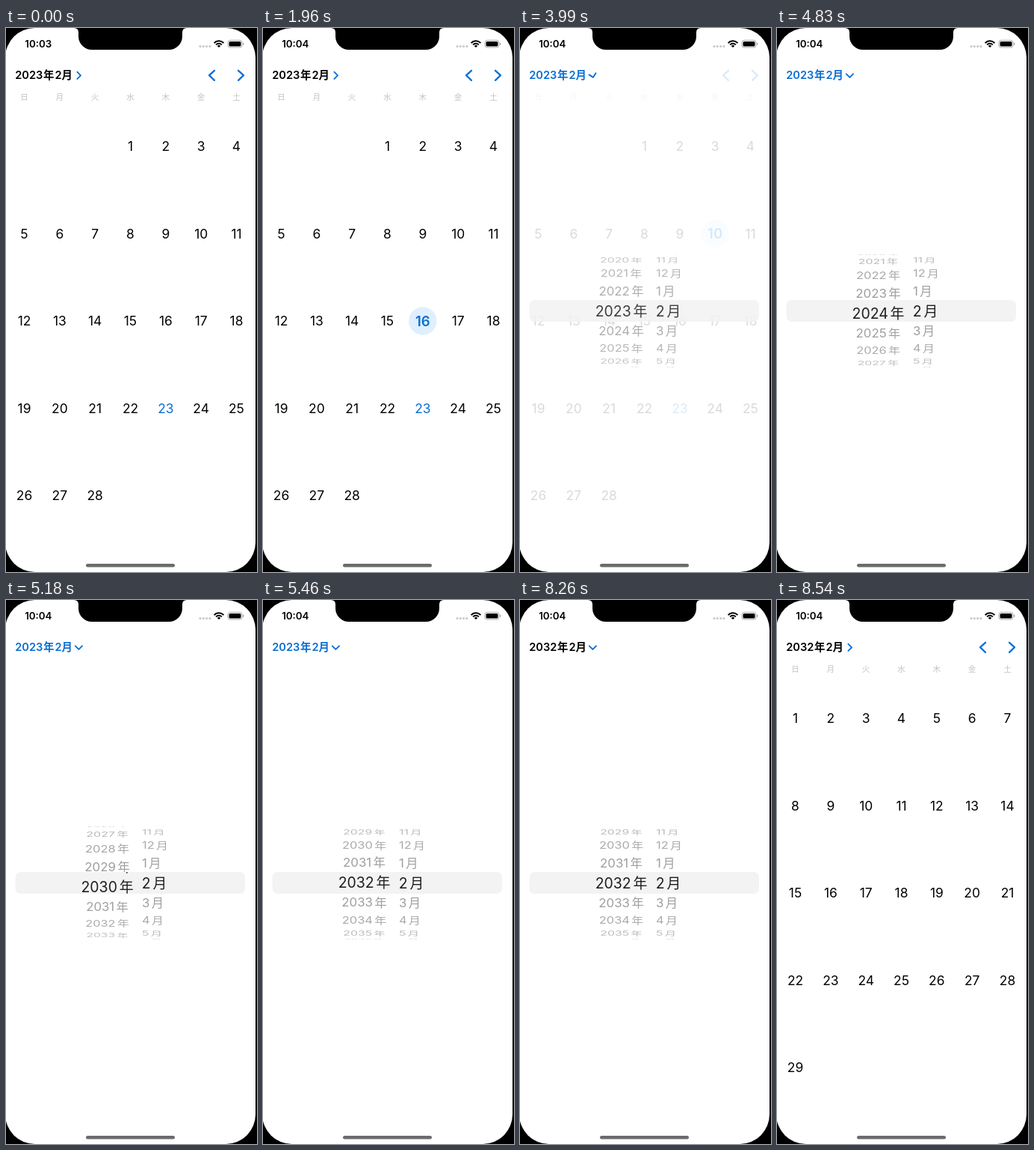
Write an HTML page with a canvas that moves like this. It is 336x726 px and loops after 8.61 s.

```html
<!DOCTYPE html>
<html lang="ja">
<head>
<meta charset="utf-8">
<title>Calendar date picker</title>
<style>
  html, body { margin: 0; width: 100%; height: 100%; overflow: hidden; background: #000; }
  canvas { display: block; width: 336px; height: 726px; }
</style>
</head>
<body>
<canvas id="stage"></canvas>
<script>
const W = 336, H = 726, LOOP = 8610, STEP = 70;
const BLUE = '#0b6fd3', BLACK = '#000';
const LATIN = 'Inter, "Liberation Sans", sans-serif';
const CJK = '"Noto Sans CJK JP", "Noto Sans CJK", sans-serif';

const canvas = document.getElementById('stage');
const ctx = canvas.getContext('2d');
const dpr = window.devicePixelRatio || 1;
canvas.width = W * dpr;
canvas.height = H * dpr;

// [time, value] tables
const SELECTED = [[0, 0], [1120, 15], [1960, 16], [2730, 10]];
const FADE = [[0, 0], [3780, 0], [3850, .2], [3920, .55], [3990, .85], [4060, 1],
  [8260, 1], [8330, .8], [8400, .45], [8470, .15], [8540, 0]];
const YEAR = [[0, 2023], [4830, 2023.87], [4900, 2025], [4970, 2026.3], [5040, 2027.6],
  [5110, 2028.8], [5180, 2029.8], [5250, 2030.7], [5320, 2031.35], [5390, 2031.8],
  [5460, 2032.02], [5670, 2032.01], [5740, 2032]];

function at(table, t) {
  let value = table[0][1];
  for (const [time, v] of table) if (t >= time) value = v;
  return value;
}

// Text centred vertically on y
function text(str, x, y, size, { color = BLACK, weight = 400, align = 'center', cjk = false } = {}) {
  ctx.font = `${weight} ${size}px ${cjk ? CJK : LATIN}`;
  ctx.textAlign = align;
  ctx.fillStyle = color;
  ctx.fillText(str, x, y + size * (cjk ? .38 : .3635));
}

function line(points, color, width) {
  ctx.beginPath();
  points.forEach(([x, y]) => ctx.lineTo(x, y));
  ctx.strokeStyle = color;
  ctx.lineWidth = width;
  ctx.lineCap = ctx.lineJoin = 'round';
  ctx.stroke();
}

function box(x, y, w, h, r, color) {
  ctx.beginPath();
  ctx.roundRect(x, y, w, h, r);
  ctx.fillStyle = color;
  ctx.fill();
}

function disc(x, y, r, color) {
  ctx.beginPath();
  ctx.arc(x, y, r, 0, Math.PI * 2);
  ctx.fillStyle = color;
  ctx.fill();
}

function drawNotch() {
  ctx.beginPath();
  ctx.moveTo(91, 0);
  ctx.quadraticCurveTo(97, 0, 97, 6);
  ctx.lineTo(97, 11);
  ctx.arcTo(97, 29, 115, 29, 18);
  ctx.lineTo(218, 29);
  ctx.arcTo(236, 29, 236, 11, 18);
  ctx.lineTo(236, 6);
  ctx.quadraticCurveTo(236, 0, 242, 0);
  ctx.fillStyle = BLACK;
  ctx.fill();
}

function drawStatus(t) {
  text(t < 70 ? '10:03' : '10:04', 43.3, 21.5, 13.3, { weight: 600 });
  for (let i = 0; i < 4; i++) disc(260 + i * 4.3, 24.5, 1.6, '#c8c8ca');

  const up = -Math.PI / 2, half = .82;
  ctx.lineCap = 'butt';
  ctx.strokeStyle = BLACK;
  ctx.lineWidth = 2;
  for (const r of [8.7, 5.3]) {
    ctx.beginPath();
    ctx.arc(285, 26, r, up - half, up + half);
    ctx.stroke();
  }
  ctx.beginPath();
  ctx.moveTo(285, 26);
  ctx.arc(285, 26, 3, up - half, up + half);
  ctx.fillStyle = BLACK;
  ctx.fill();

  ctx.beginPath();
  ctx.roundRect(297, 16.4, 19, 9.6, 3);
  ctx.strokeStyle = '#a4a4a6';
  ctx.lineWidth = .9;
  ctx.stroke();
  box(298.5, 17.9, 16, 6.6, 1.6, BLACK);
  box(317, 19.6, 1.3, 3.2, .7, '#a4a4a6');
}

function drawTitle(year, color, turn) {
  const style = { color, weight: 600 };
  const kanji = { ...style, cjk: true };
  text(year, 12.2, 63, 14.6, { ...style, align: 'left' });
  text('年', 57.3, 63, 14.4, kanji);
  text('2', 70.1, 63, 14.6, style);
  text('月', 81.6, 63, 14.4, kanji);

  ctx.save();
  ctx.translate(97.4, 63.3);
  ctx.rotate(turn * Math.PI / 2);
  line([[-2, -4.6], [2.6, 0], [-2, 4.6]], BLUE, 1.9);
  ctx.restore();
}

function drawCalendar(year, selected) {
  line([[279, 56.8], [272, 63.2], [279, 69.8]], BLUE, 2.3);
  line([[311, 56.8], [318, 63.2], [311, 69.8]], BLUE, 2.3);

  const colX = c => 24.5 + c * 47.33;
  [...'日月火水木金土'].forEach((d, c) =>
    text(d, colX(c), 92, 10.6, { color: '#c3c3c5', weight: 500, cjk: true }));

  const first = new Date(year, 1, 1).getDay();
  const days = new Date(year, 2, 0).getDate();
  for (let d = 1; d <= days; d++) {
    const slot = first + d - 1;
    const x = colX(slot % 7), y = 158 + Math.floor(slot / 7) * 116.5;
    if (d === selected) {
      disc(x, y, 18.7, '#dfeffe');
      text(d, x, y, 18.6, { color: BLUE, weight: 600 });
    } else {
      const today = year === 2023 && d === 23;
      text(d, x, y, 17.4, { color: today ? BLUE : BLACK });
    }
  }
}

const MID = 377.5, RADIUS = 78, ROW = Math.PI / 9, ZOOM = 1.145;

// One column on a turning cylinder; x is the point its rows scale about
function drawColumn(pos, x, zoomed, label) {
  for (let i = Math.round(pos) - 4; i <= Math.round(pos) + 4; i++) {
    const angle = (i - pos) * ROW, depth = Math.cos(angle);
    if (depth <= .02) continue;
    const zoom = zoomed ? ZOOM : 1;
    const alpha = zoomed ? .88 : .4 * (.35 + .65 * depth);
    ctx.save();
    ctx.translate(x, MID + RADIUS * Math.sin(angle));
    ctx.scale(zoom * (1 - .14 * (1 - depth)), zoom * depth);
    label(i, `rgba(0,0,0,${alpha})`);
    ctx.restore();
  }
}

function numberAndUnit(num, unit, color, centred) {
  ctx.font = `400 17px ${LATIN}`;
  const w = ctx.measureText(num).width, gap = 2.4, size = 16.5;
  const x = centred ? -(w + gap + size) / 2 : -1;
  text(num, x, 0, 17, { color, align: 'left' });
  text(unit, x + w + gap, 0, size, { color, align: 'left', cjk: true });
}

function drawColumns(pos, zoomed) {
  drawColumn(pos, 135.5, zoomed, (i, c) => numberAndUnit(i, '年', c, true));
  drawColumn(2, 183, zoomed, (i, c) => numberAndUnit((i + 11) % 12 + 1, '月', c, false));
}

function clipped(rects, draw) {
  ctx.save();
  ctx.beginPath();
  rects.forEach(([top, bottom]) => ctx.rect(0, top, W, bottom - top));
  ctx.clip();
  draw();
  ctx.restore();
}

function drawWheel(pos) {
  const top = 363, bottom = 392;
  box(12.5, top, 307.5, bottom - top, 7, '#f3f3f4');
  clipped([[302, top], [bottom, 453]], () => drawColumns(pos, false));
  clipped([[top, bottom]], () => drawColumns(pos, true));
}

function withAlpha(alpha, draw) {
  if (alpha <= 0) return;
  ctx.globalAlpha = alpha;
  draw();
  ctx.globalAlpha = 1;
}

function draw(t) {
  ctx.setTransform(dpr, 0, 0, dpr, 0, 0);
  ctx.fillStyle = BLACK;
  ctx.fillRect(0, 0, W, H);
  box(-1, 0, 335, H, 39.5, '#fff');
  drawNotch();
  drawStatus(t);

  const fade = at(FADE, t);
  const year = t < 5670 ? 2023 : 2032;
  const picking = t >= 3780 && t < 8260;
  withAlpha(1 - fade, () => drawCalendar(year, year === 2023 ? at(SELECTED, t) : 0));
  withAlpha(fade, () => drawWheel(at(YEAR, t)));
  drawTitle(year, picking ? BLUE : BLACK, fade);
  box(107, 715, 119, 4.4, 2.2, '#6b6b6e');
}

const start = performance.now();
function tick() {
  const t = (performance.now() - start) % LOOP;
  draw(Math.floor(t / STEP) * STEP);
  requestAnimationFrame(tick);
}
tick();
</script>
</body>
</html>
```
